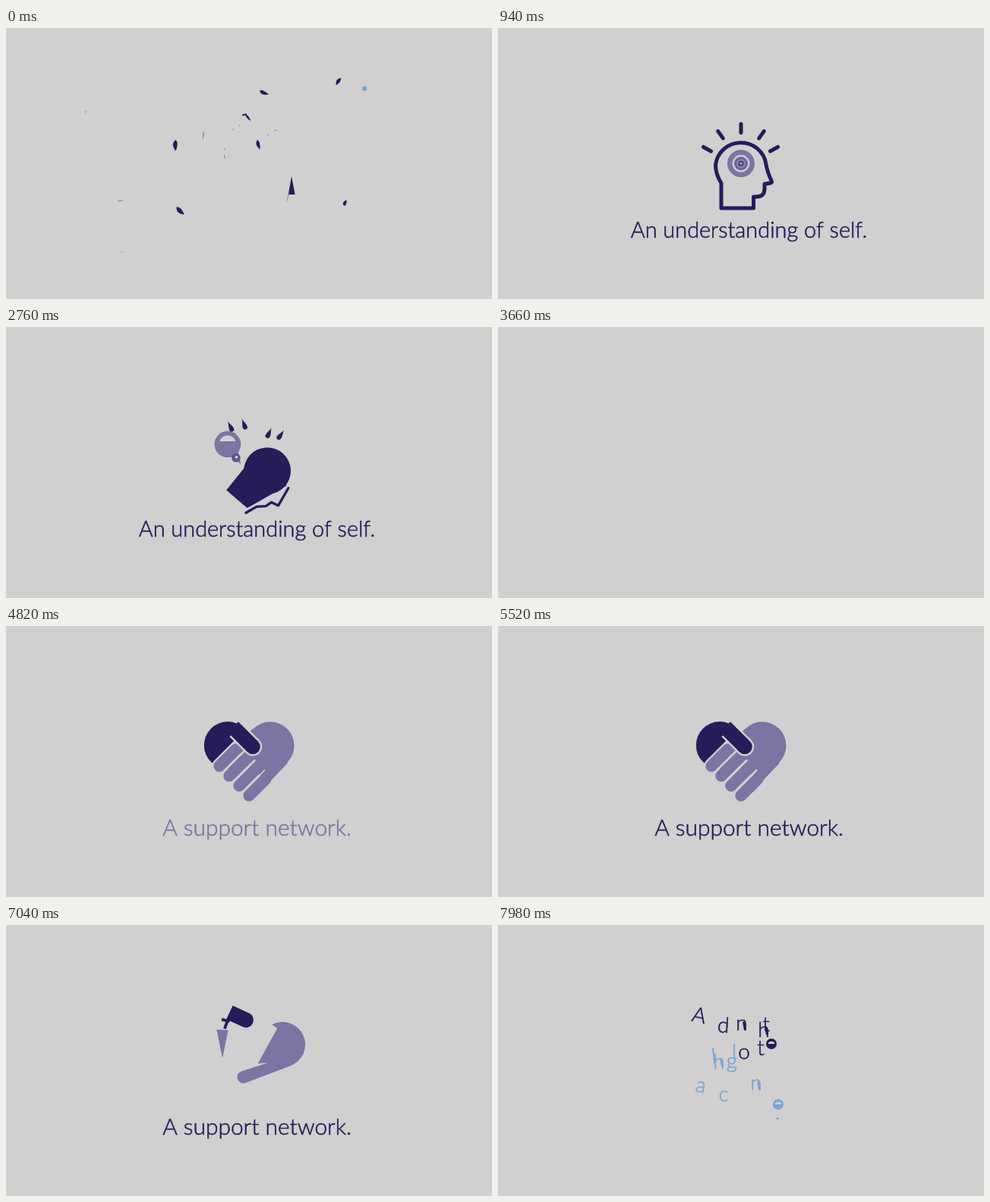
An HTML page with a canvas for the animation above (8000 ms loop, 640x358 px).

```html
<!DOCTYPE html>
<html lang="en">
<head>
<meta charset="utf-8">
<title>Understanding and support</title>
<style>
html, body { margin: 0; width: 100%; height: 100%; overflow: hidden; background: #d1cfcf; }
canvas { display: block; width: 100vw; height: 100vh; }
</style>
</head>
<body>
<canvas id="stage"></canvas>
<script>
const LOOP = 8000, BG = '#d1cfcf', DARK = '#251c5a', LILAC = '#7a75a3', BLUE = '#7aa5d4';
const FONT = "Lato, 'Open Sans', sans-serif";
const canvas = document.getElementById('stage'), ctx = canvas.getContext('2d');
const ratio = window.devicePixelRatio || 1;
canvas.width = 640 * ratio;
canvas.height = 358 * ratio;

const clamp = v => Math.max(0, Math.min(1, v));
const span = (t, a, b) => clamp((t - a) / (b - a));
const easeOut = u => 1 - (1 - u) ** 3;
const rad = d => d * Math.PI / 180;
const random = n => { const s = Math.sin(n * 127.1 + 31.7) * 43758.5453; return s - Math.floor(s); };
const mix = u => {
  const a = [122, 117, 165], b = [37, 28, 90];
  return `rgb(${a.map((v, i) => Math.round(v + (b[i] - v) * u))})`;
};

function at(x, y, deg, sx, sy, draw) {
  ctx.save();
  ctx.translate(x, y);
  ctx.rotate(rad(deg));
  ctx.scale(sx, sy);
  draw();
  ctx.restore();
}
function disc(x, y, r, color) {
  ctx.fillStyle = color;
  ctx.beginPath();
  ctx.arc(x, y, r, 0, 7);
  ctx.fill();
}
function ring(x, y, r, width, color) {
  ctx.strokeStyle = color;
  ctx.lineWidth = width;
  ctx.beginPath();
  ctx.arc(x, y, r, 0, 7);
  ctx.stroke();
}
function line(x1, y1, x2, y2, width, color, cap = 'round') {
  ctx.strokeStyle = color;
  ctx.lineWidth = width;
  ctx.lineCap = cap;
  ctx.beginPath();
  ctx.moveTo(x1, y1);
  ctx.lineTo(x2, y2);
  ctx.stroke();
}
function fill(d, color) {
  ctx.fillStyle = color;
  ctx.fill(new Path2D(d));
}
function outline(d, width, color) {
  ctx.strokeStyle = color;
  ctx.lineWidth = width;
  ctx.lineJoin = ctx.lineCap = 'round';
  ctx.stroke(new Path2D(d));
}
// Light type, thickened a little
function type(text, x, y, color) {
  ctx.fillStyle = ctx.strokeStyle = color;
  ctx.lineWidth = .55;
  ctx.lineJoin = 'round';
  ctx.fillText(text, x, y);
  ctx.strokeText(text, x, y);
}
function sliver(x, y, length, width, deg, color) {
  at(x, y, deg, 1, 1, () => {
    const h = length / 2;
    fill(`M${-h} ${-width / 3} Q${-h / 3} ${-width} ${h} ${width / 2} Q${-h / 2} ${width * 1.4} ${-h} ${-width / 3}Z`, color);
  });
}
// Moves a piece away from its home while it turns and shrinks.
function fly(u, x, y, dx, dy, spin, draw) {
  if (u >= 1) return;
  const e = easeOut(u), s = 1 - u * u;
  at(x + dx * e, y + dy * e, spin * e, s, s, draw);
}

// Head
const HEAD = 'M294 238V205C289 197 286.5 190 286.5 181A33.5 33 0 0 1 353 180C354 187 357 195 360.5 203Q361 205 351 206V212C351 221 347 223 336.5 223V238Z';
const FACE = 'M337 243L342 227L351 218L353 209L363 206L357 179';
const RAYS = [[275.5, 160, -61], [293, 141, -35], [320, 132.5, 0], [347, 141, 35], [363.5, 160, 61]];

function drawHead() {
  outline(HEAD, 5, DARK);
  for (const [x, y, deg] of RAYS) at(x, y, deg, 1, 1, () => line(0, -5.7, 0, 5.7, 5, DARK));
  ring(320, 179, 14.7, 6.6, LILAC);
  disc(320, 179, 9, '#68629a');
  ring(320, 179, 5.2, 1.2, '#9d99bb');
  disc(320, 179, 3.2, '#48417e');
  disc(320, 179, 1.3, BG);
}

function breakHead(u) {
  fly(u, 320, 181, 53, 20, 93, () => {
    ctx.translate(-320, -181);
    disc(320, 181, 32, DARK);
    fill('M296.5 238L334 237L353 178L293 181Z', DARK);
    fill(FACE + 'L345 210L333 239Z', BG);
    outline(FACE, 3.4, DARK);
  });
  const drift = [[44, -62, 78], [45, -27, 33], [58, 17, 55], [32, 4, 0]];
  drift.forEach(([dx, dy, spin], i) => {
    const [x, y, deg] = RAYS[i];
    fly(u, x, y, dx, dy, spin, () => {
      ctx.rotate(rad(deg));
      fill('M0 -8C1 -3 3.5 0 3.2 4A3.2 3.2 0 0 1 -3.2 4C-3 0 -1 -3 0 -8Z', DARK);
    });
  });
  fly(u, 320, 179, -62, -53, 0, () => {
    disc(0, 0, 18, LILAC);
    fill('M2 15L14 9L18 27Z', LILAC);
    fill('M-11 -4A11.5 11.5 0 0 1 11 -4Z', BG);
    disc(11.5, 18.5, 6, '#5a5390');
    disc(12, 17.5, 2, BG);
  });
}

// Clasped hands
const HAND = 'M321 141A31.4 31.4 0 1 1 370 180L326 230A8 8 0 0 1 314 218L341 190L329 198L330 142Z';

function drawHeart(t) {
  disc(292, 157.5, 31.2, DARK);
  line(281, 185, 309, 157, 20, BG);
  disc(348, 158, 31.5, LILAC);
  fill('M302 158L325 136L371 181L348 205L322 190Z', LILAC);
  for (let i = 0; i < 4; i++) {
    const o = i * 13;
    line(281 + o, 185 + o, 303 + o, 163 + o, 15.4, LILAC);
  }
  for (let i = 0; i < 3; i++) {
    const o = i * 13, u = span(t, 4480 + i * 130, 4700 + i * 130);
    line(287.5 + o, 191.5 + o, 315 + o, 164 + o, .8 + 1.8 * u, BG, 'butt');
  }
  line(303, 137.5, 325, 159.5, 24.4, BG, 'butt');
  disc(325, 159.5, 12.2, BG);
  line(299, 133.5, 325, 159.5, 19.6, DARK, 'butt');
  disc(325, 159.5, 9.8, DARK);
}

function breakHeart(u) {
  const rest = 1 - span(u, 0, .16);
  at(291 - 18 * (1 - rest), 157, 0, rest, rest, () => disc(0, 0, 31, DARK));
  fly(u, 348, 157, 34, 0, 53, () => {
    ctx.translate(-348, -157);
    fill(HAND, LILAC);
  });
  fly(u, 296, 171, -21, -34, 0, () => {
    fill('M-8 -16L8 -15L0 24Z', LILAC);
    line(3, -17, 7, -28, 4, DARK, 'butt');
    line(-1, -30, 10, -27, 4, DARK, 'butt');
  });
  fly(u, 315, 146, -13, -46, -38, () => {
    ctx.rotate(rad(45));
    fill('M-16 -10.5H9A10.5 10.5 0 0 1 9 10.5H-16Z', DARK);
  });
}

// Captions, whose letters scatter at the end of a scene
function caption(t, text, size, fadeIn, scatter, seed) {
  if (t < fadeIn || t > scatter + 780) return;
  ctx.font = `300 ${size}px ${FONT}`;
  ctx.textAlign = 'left';
  ctx.textBaseline = 'alphabetic';
  const left = 330.5 - ctx.measureText(text).width / 2;
  const color = mix(span(t, fadeIn + 340, fadeIn + 600));
  if (t < scatter) {
    ctx.globalAlpha = span(t, fadeIn, fadeIn + 260);
    type(text, left, 276.5, color);
    ctx.globalAlpha = 1;
    return;
  }
  [...text].forEach((char, i) => {
    if (char === ' ') return;
    const n = seed + i * 5, start = scatter + random(n) * 150;
    const u = span(t, start, start + 620), e = easeOut(u);
    if (u >= 1) return;
    const width = ctx.measureText(char).width;
    const x = left + ctx.measureText(text.slice(0, i)).width + width / 2;
    const toX = 320 + (x - 320) * 1.08 + (random(n + 1) - .5) * 80;
    const toY = 66 + random(n + 2) * 225;
    const px = x + (toX - x) * e, py = 268 + (toY - 268) * e;
    const spin = (random(n + 3) - .5) * 200 * e;
    if (u > .6) {
      const s = (1 - u) / .4;
      sliver(px, py, 13 * s, 4 * s, spin + 60, color);
    } else {
      at(px, py, spin, 1 - .6 * u, 1 - .3 * u, () => type(char, -width / 2, 8.5, color));
    }
  });
}

// Last crumbs of the preceding scene: x, y, length, width, angle
const CRUMBS = [
  [340, 85, 13, 4, 8], [319, 118, 11, 2.5, 40], [438, 71, 11, 4, 105], [224, 155, 14, 5, 72],
  [333, 154, 13, 4, 60], [230, 241, 14, 5, 28], [447, 231, 6, 5, 60]
];
const FAINT = [
  [260, 142, 12, 1.3, 88], [151, 228, 9, 1.2, -18], [105, 111, 4, 1, 90], [299, 134, 3, 1, 20], [308, 129, 3, 1, 90],
  [345, 141, 3, 1, 0], [355, 135, 4, 1.3, -25], [288, 160, 3, 1, 20], [288, 170, 6, 1.2, 75], [153, 296, 3, .8, 0]
];
function crumbs(t) {
  const u = span(t, 0, 280);
  if (u >= 1) return;
  const s = 1 - u, out = 1 + .08 * easeOut(u);
  const spread = (x, y) => [320 + (x - 320) * out, 180 + (y - 180) * out];
  const scatter = (list, color) => {
    for (const [x, y, length, width, deg] of list) sliver(...spread(x, y), length * s, width * s, deg + 40 * u, color);
  };
  scatter(CRUMBS, DARK);
  scatter(FAINT, '#8581b0');
  at(...spread(312, 115), 0, s, s, () => line(0, 0, 4, -1, 2, DARK));
  at(...spread(472, 80), 0, s, s, () => disc(0, 0, 3.1, BLUE));
  at(...spread(376, 211), 0, s, s, () => {
    fill('M0 -15L4.5 9H-4.5Z', DARK);
    line(-3, 4, -6, 17, .8, LILAC);
  });
}

// Letters of the following scene: glyph, x, y, angle
const NEXT_DARK = [['A', 265, 119, 12], ['d', 297, 132, 4], ['n', 321, 132, 0], ['h', 350, 138, 0], ['t', 353, 131, 0],
  ['o', 324, 170, 0], ['t', 346, 162, 0], ['e', 360, 157, 0]];
const NEXT_BLUE = [['l', 284, 173, -6], ['h', 291, 180, 0], ['l', 311, 167, 0], ['g', 308, 182, 0], ['a', 267, 214, 10],
  ['c', 297, 226, 0], ['n', 340, 211, 0], ['e', 369, 237, 0], ['.', 368, 256, 0]];
function nextLetters(t) {
  if (t < 7720) return;
  ctx.textAlign = 'center';
  ctx.font = `300 28px ${FONT}`;
  const show = (list, color) => list.forEach(([char, x, y, deg], i) => {
    const u = easeOut(span(t, 7720 + i * 10, 7980));
    const baseline = char === '.' ? 1 : /[Adhlt]/.test(char) ? 10 : 7;
    at(320 + (x - 320) * u, 180 + (y - 180) * u, deg + 60 * (1 - u), u, u, () => {
      if (char === 'e') {
        disc(0, 0, 7, color);
        fill('M-4.5 0A4.6 4 0 0 1 4.5 0Z', BG);
        return;
      }
      type(char, 0, baseline, color);
      if (char === 'n' || char === 'h') fill('M1 -4Q6 -6 6 7L3 7Z', color);
    });
  });
  show(NEXT_DARK, DARK);
  show(NEXT_BLUE, BLUE);
}

function icon(t, from, until, draw, shatter) {
  if (t < from || t > until + 1100) return;
  if (t < until) {
    ctx.globalAlpha = span(t, from, from + 300);
    draw(t);
    ctx.globalAlpha = 1;
  } else shatter(span(t, until, until + 1100));
}

function render(t) {
  ctx.setTransform(ratio, 0, 0, ratio, 0, 0);
  ctx.fillStyle = BG;
  ctx.fillRect(0, 0, 640, 358);
  crumbs(t);
  icon(t, 300, 2560, drawHead, breakHead);
  caption(t, 'An understanding of self.', 28.9, 330, 2900, 3);
  icon(t, 4140, 6800, drawHeart, breakHeart);
  caption(t, 'A support network.', 29.9, 4500, 7100, 8);
  nextLetters(t);
}

const begin = performance.now();
function tick() {
  render((performance.now() - begin) % LOOP);
  requestAnimationFrame(tick);
}
render(0);
requestAnimationFrame(tick);
</script>
</body>
</html>
```
